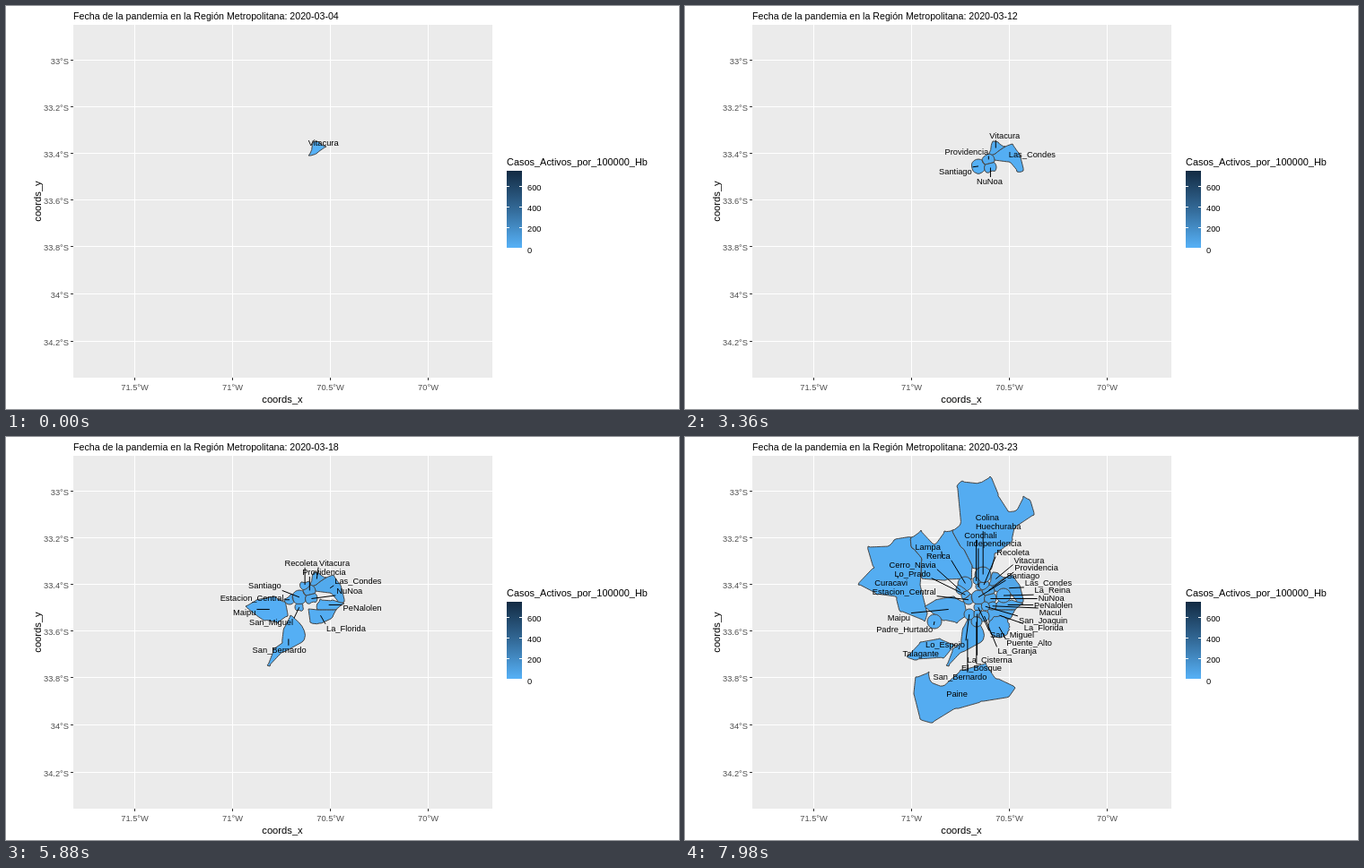
An HTML page with a canvas for the animation above (8000 ms loop, 750 px wide and 450 px high).

```html
<!DOCTYPE html>
<html lang="es">
<head>
<meta charset="utf-8">
<style>
html, body { margin: 0; width: 100%; height: 100%; overflow: hidden; background: #fff; }
canvas { display: block; width: 750px; height: 450px; }
</style>
</head>
<body>
<canvas id="map" width="750" height="450"></canvas>
<script>
const ctx = document.getElementById('map').getContext('2d');
const LOOP = 8000, STEP = 420, LAST_DAY = 19;
const FONT = '"Liberation Sans", Arial, sans-serif';
const CITY = { x: 331, y: 180 };

// Large communes: name, first day, corner points.
const OUTLINES = [
  ['Colina', 15, '303,55 309,49 328,51 340,44 349,66 360,83 369,82 377,66 384,70 389,87 368,101 365,115 345,130 341,148 320,146 309,124 298,104 307,97'],
  ['Curacavi', 16, '204,122 228,121 233,115 252,112 253,124 264,137 262,165 270,197 267,206 240,195 236,179 214,176 193,165 211,146'],
  ['Lampa', 17, '252,112 263,104 278,120 289,105 298,104 309,124 320,146 320,159 290,160 264,158 264,137 253,124'],
  ['Paine', 15, '257,268 272,262 274,273 287,278 307,260 335,252 347,270 368,280 361,290 330,295 302,303 276,319 262,315 255,287'],
  ['Talagante', 19, '247,245 262,229 284,225 300,232 288,247 258,249'],
  ['Maipu', 13, '267,189 279,182 300,178 311,184 314,200 303,208 288,205 278,198'],
  ['San_Bernardo', 14, '317,199 328,209 333,219 331,228 309,240 294,256 291,255 298,237 308,230 310,213'],
  ['Las_Condes', 4, '337,167 347,164 357,157 365,154 372,164 377,184 370,185 361,174 345,172'],
  ['Vitacura', 0, '343,151 349,152 357,157 347,164 337,167 341,158'],
  ['PeNalolen', 12, '347,186 350,181 364,182 377,186 368,193 347,193'],
  ['La_Florida', 11, '337,192 347,193 368,193 364,201 349,208 339,207']
];

// Small communes: name, first day, centre and radius; neighbours share a border.
const CELLS = [
  ['Providencia', 1, 338, 172, 7], ['NuNoa', 7, 340, 180, 7],
  ['Santiago', 8, 327, 179, 8], ['Estacion_Central', 9, 316, 181, 6],
  ['Recoleta', 13, 333, 165, 6], ['San_Miguel', 13, 327, 190, 5],
  ['Huechuraba', 15, 332, 154, 9], ['Renca', 15, 312, 164, 8],
  ['Independencia', 15, 328, 167, 4], ['Puente_Alto', 15, 350, 212, 12],
  ['Conchali', 16, 326, 160, 5], ['Cerro_Navia', 16, 308, 170, 6],
  ['La_Cisterna', 16, 326, 198, 5], ['El_Bosque', 16, 325, 206, 6],
  ['La_Reina', 17, 355, 177, 8], ['Lo_Prado', 18, 313, 177, 5],
  ['Macul', 18, 342, 188, 5], ['La_Granja', 18, 333, 200, 6],
  ['Lo_Espejo', 18, 317, 198, 6], ['San_Joaquin', 19, 335, 189, 5],
  ['Padre_Hurtado', 19, 278, 206, 8]
];

const clamp = (v, lo, hi) => Math.min(Math.max(v, lo), hi);

// Splits a border into small uneven steps, the same from both sides.
function roughen(a, b) {
  const flip = a[0] > b[0] || (a[0] === b[0] && a[1] > b[1]);
  const [p, q] = flip ? [b, a] : [a, b];
  const dx = q[0] - p[0], dy = q[1] - p[1], len = Math.hypot(dx, dy) || 1;
  const n = Math.max(1, Math.round(len / 2.5)), pts = [];
  for (let k = 0; k <= n; k++) {
    const off = k % n ? Math.sin(p[0] * 12.9 + p[1] * 78.2 + k * 37.7) : 0;
    pts.push([p[0] + dx * k / n - dy / len * off, p[1] + dy * k / n + dx / len * off]);
  }
  return (flip ? pts.reverse() : pts).slice(0, -1);
}

function makeArea(name, day, pts) {
  const path = new Path2D();
  let sum = 0, x = 0, y = 0;
  pts.forEach((p, i) => {
    const q = pts[(i + 1) % pts.length], cross = p[0] * q[1] - q[0] * p[1];
    sum += cross;
    x += (p[0] + q[0]) * cross;
    y += (p[1] + q[1]) * cross;
    roughen(p, q).forEach(r => path.lineTo(...r));
  });
  path.closePath();
  return { name, day, path, x: x / sum / 3, y: y / sum / 3 };
}

// A disc cut along the chords it shares with overlapping discs.
function cellOutline(cell) {
  const [, , cx, cy, r] = cell;
  let pts = Array.from({ length: 20 }, (_, i) => {
    const a = i * Math.PI / 10;
    return [cx + r * Math.cos(a), cy + r * Math.sin(a)];
  });
  const power = (p, x, y, rad) => (p[0] - x) ** 2 + (p[1] - y) ** 2 - rad * rad;
  for (const other of CELLS) {
    if (other === cell) continue;
    const side = p => power(p, cx, cy, r) - power(p, ...other.slice(2));
    pts = pts.flatMap((p, i) => {
      const q = pts[(i + 1) % pts.length], a = side(p), b = side(q), t = a / (a - b);
      const kept = a <= 0 ? [p] : [];
      if (a * b < 0) kept.push([p[0] + (q[0] - p[0]) * t, p[1] + (q[1] - p[1]) * t]);
      return kept;
    });
  }
  return pts;
}

const areas = [
  ...OUTLINES.map(([name, day, pts]) => makeArea(name, day, pts.split(' ').map(s => s.split(',').map(Number)))),
  ...CELLS.map(c => makeArea(c[0], c[1], cellOutline(c)))
];

// Labels fan out from the middle of the visible areas, then push each other apart.
function placeLabels(shown) {
  ctx.font = '9.3px ' + FONT;
  const mean = k => shown.reduce((s, a) => s + a[k], CITY[k]) / (shown.length + 1);
  const mx = mean('x'), my = mean('y'), crowd = Math.sqrt(shown.length / areas.length);
  const labels = shown.map(area => {
    const dx = area.x - mx, dy = area.y - my, d = Math.hypot(dx, dy) || 1;
    const reach = crowd * Math.exp(-((d / 60) ** 2)) / d;
    return {
      area, w: ctx.measureText(area.name).width,
      x: area.x + 75 * dx * reach, y: area.y + 40 * dy * reach
    };
  });
  for (let pass = 0; pass < 80; pass++) {
    labels.forEach((a, i) => labels.slice(i + 1).forEach(b => {
      const ox = (a.w + b.w) / 2 + 2 - Math.abs(a.x - b.x), oy = 10 - Math.abs(a.y - b.y);
      if (ox <= 0 || oy <= 0) return;
      const axis = ox < oy ? 'x' : 'y';
      const push = Math.min(ox, oy) / 4 * (a[axis] < b[axis] ? -1 : 1);
      a[axis] += push;
      b[axis] -= push;
    }));
  }
  return labels;
}

const days = Array.from({ length: LAST_DAY + 1 }, (_, day) => {
  const shown = areas.filter(a => a.day <= day);
  return { shown, labels: placeLabels(shown) };
});

function text(s, x, y, size, color = '#000', align = 'left') {
  ctx.font = size + 'px ' + FONT;
  ctx.fillStyle = color;
  ctx.textAlign = align;
  ctx.fillText(s, x, y);
}

function rect(x, y, w, h, fill) {
  ctx.fillStyle = fill;
  ctx.fillRect(x, y, w, h);
}

function drawChart(day) {
  rect(0, 0, 750, 450, '#fff');
  rect(75, 21, 467, 394, '#ebebeb');
  const date = '2020-03-' + String(4 + day).padStart(2, '0');
  text('Fecha de la pandemia en la Región Metropolitana: ' + date, 75, 15, 10.65);

  for (let i = 0; i < 4; i++) {
    const x = 143 + 109 * i;
    rect(x, 21, 1, 394, '#fff');
    rect(x, 415, 1, 3, '#333');
    text(71.5 - i / 2 + '°W', x + .5, 429, 9.3, '#4d4d4d', 'center');
  }
  for (let i = 0; i < 7; i++) {
    const y = Math.floor(60.2 + 51.9 * i + .07 * i * i);
    rect(75, y, 467, 1, '#fff');
    rect(72, y, 3, 1, '#333');
    text((330 + 2 * i) / 10 + '°S', 70, y + 4.5, 9.3, '#4d4d4d', 'right');
  }
  text('coords_x', 308, 443, 11.2, '#000', 'center');
  ctx.save();
  ctx.translate(39, 218);
  ctx.rotate(-Math.PI / 2);
  text('coords_y', 0, 0, 11.2, '#000', 'center');
  ctx.restore();

  text('Casos_Activos_por_100000_Hb', 558, 178, 10.95);
  const ramp = ctx.createLinearGradient(0, 184, 0, 270);
  ['#132b43', '#336a98', '#56b1f7'].forEach((c, i) => ramp.addColorStop(i / 2, c));
  rect(558, 184, 17, 86, ramp);
  for (let n = 0; n <= 600; n += 200) {
    const y = Math.round(270.5 - n * .116);
    if (n) [558, 572].forEach(x => rect(x, y, 3, 1, '#fff'));
    text(n, 581, y + 4.5, 9.3);
  }
}

// Areas darken slowly with the time since their first case.
function shade(area, day) {
  const t = .02 * day / LAST_DAY + .004 * (day - area.day);
  return `rgb(${86 - 67 * t}, ${177 - 134 * t}, ${247 - 180 * t})`;
}

function drawMap(day) {
  const { shown, labels } = days[day];
  ctx.lineJoin = 'round';
  ctx.lineWidth = 1;
  ctx.strokeStyle = '#444';
  for (const area of shown) {
    ctx.fillStyle = shade(area, day);
    ctx.fill(area.path);
    ctx.stroke(area.path);
  }
  ctx.strokeStyle = '#000';
  for (const { area, x, y, w } of labels) {
    const ex = clamp(area.x, x - w / 2 - 1, x + w / 2 + 1), ey = clamp(area.y, y - 5, y + 5);
    if (Math.hypot(area.x - ex, area.y - ey) < 1.5) continue;
    ctx.beginPath();
    ctx.moveTo(ex, ey);
    ctx.lineTo(area.x, area.y);
    ctx.stroke();
  }
  for (const { area, x, y } of labels) text(area.name, x, y + 3, 9.3, '#000', 'center');
}

function frame() {
  const day = Math.floor(performance.now() % LOOP / STEP);
  drawChart(day);
  drawMap(day);
  requestAnimationFrame(frame);
}
frame();
</script>
</body>
</html>
```
